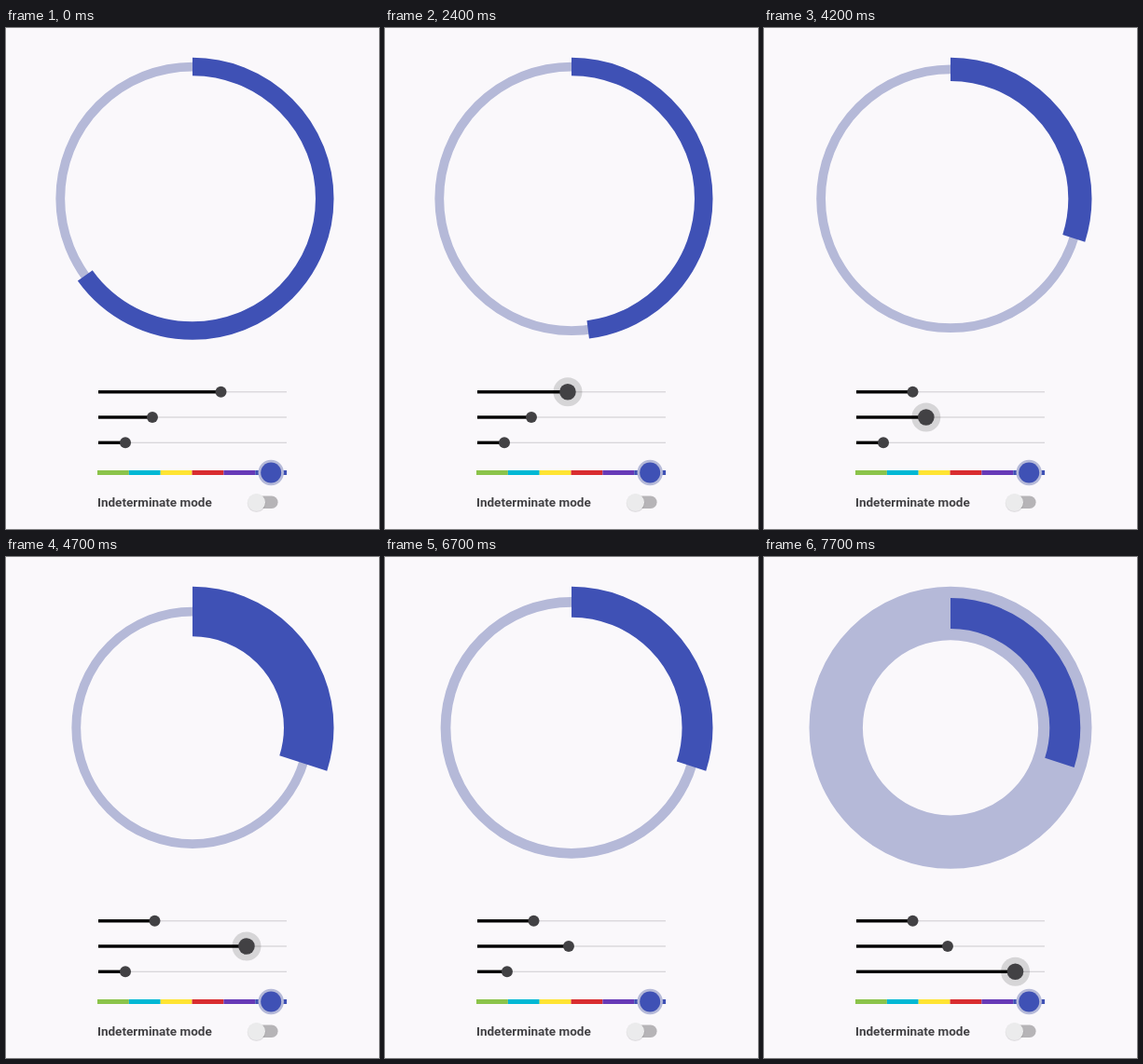
These frames come from a looping animation (400 by 538 pixels, 8000 ms). An HTML page:

```html
<!DOCTYPE html>
<html lang="en">
<head>
<meta charset="utf-8">
<title>Progress ring</title>
<style>
  html, body { margin: 0; height: 100%; overflow: hidden; background: #faf8fb; }
  svg { display: block; width: 400px; height: 538px; }
  text { font: 700 13.5px Roboto, sans-serif; fill: #424144; }
</style>
</head>
<body>
<svg id="stage" viewBox="0 0 400 538">
  <g fill="none" transform="rotate(-90 200 183.3)">
    <circle id="track" cx="200" cy="183.3" stroke="#b5b9d8"/>
    <circle id="progress" cx="200" cy="183.3" stroke="#3f51b5" pathLength="1"/>
  </g>
  <g id="sliders"></g>
  <g id="palette"></g>
  <circle cx="284.2" cy="477.5" r="13.7" fill="#b5b9d8"/>
  <circle cx="284.2" cy="477.5" r="11" fill="#3f51b5"/>
  <text x="98" y="514.4">Indeterminate mode</text>
  <rect x="262" y="502.6" width="29.6" height="13.4" rx="6.7" fill="#b6b4b7"/>
  <circle cx="268.6" cy="510.2" r="9.8" fill="#000" opacity=".1"/>
  <circle cx="268.6" cy="509.4" r="9.4" fill="#ebebec"/>
</svg>
<script>
const LOOP = 8000, TICK = 100;
const LEFT = 99, WIDTH = 202;
const OUTER = 151.5, MAX_STROKE = 68;

// keys: [ms, value]; press: [start, end] of the touch
const sliders = [
  { y: 390.8, press: [500, 3800], keys: [
    [500, .651], [1100, .869], [1200, .869], [1300, .8985], [2000, .14], [2100, .14],
    [2400, .48], [2900, .8], [3000, .8], [3400, .371], [3600, .312], [3800, .2995]] },
  { y: 418, press: [4000, 6200], keys: [
    [4100, .287], [4700, .787], [4900, .8], [5100, .34], [5200, .34], [5400, .08],
    [5500, .08], [5900, .455], [6000, .455], [6200, .485]] },
  { y: 445.3, press: [6700, Infinity], keys: [
    [6600, .1436], [6700, .158], [7500, .8], [7600, .8], [7700, .844]] }
];

const $ = id => document.getElementById(id);
const clamp = v => Math.max(0, Math.min(1, v));

function add(parent, tag, attrs) {
  const node = document.createElementNS("http://www.w3.org/2000/svg", tag);
  set(node, attrs);
  return parent.appendChild(node);
}

function set(node, attrs) {
  for (const name in attrs) node.setAttribute(name, attrs[name]);
}

function valueAt(keys, t) {
  const i = keys.findIndex(([time]) => time > t);
  if (i < 0) return keys[keys.length - 1][1];
  if (i === 0) return keys[0][1];
  const [t0, a] = keys[i - 1], [t1, b] = keys[i];
  return a + (b - a) * (t - t0) / (t1 - t0);
}

for (const s of sliders) {
  const g = $("sliders");
  add(g, "rect", { x: LEFT, y: s.y - .6, width: WIDTH, height: 1.2, fill: "#d5d3d6" });
  s.fill = add(g, "rect", { x: LEFT, y: s.y - 1.7, height: 3.4, fill: "#000" });
  s.halo = add(g, "circle", { cy: s.y, fill: "#000", opacity: .14 });
  s.thumb = add(g, "circle", { cy: s.y, fill: "#424144" });
}

["#8bc34a", "#00b8d4", "#ffe433", "#d92d30", "#673ab7", "#3f51b5"].forEach((fill, i) =>
  add($("palette"), "rect", { x: 98 + i * 33.85, y: 475, width: 33.85, height: 5, fill }));

function draw(t) {
  const [amount, stroke, trackStroke] = sliders.map(s => {
    const value = valueAt(s.keys, t), x = LEFT + WIDTH * value;
    const pressed = clamp(Math.min(t - s.press[0], s.press[1] - t) / 200);
    set(s.fill, { width: x - LEFT });
    set(s.halo, { cx: x, r: 15.5 * pressed });
    set(s.thumb, { cx: x, r: 6 + 2.8 * pressed });
    return value;
  });
  const r = OUTER - MAX_STROKE * Math.max(stroke, trackStroke) / 2;
  set($("track"), { r, "stroke-width": MAX_STROKE * trackStroke });
  set($("progress"), { r, "stroke-width": MAX_STROKE * stroke, "stroke-dasharray": `${amount} 2` });
}

const start = performance.now();
function frame() {
  const t = (performance.now() - start) % LOOP;
  draw(Math.floor(t / TICK) * TICK);
  requestAnimationFrame(frame);
}
frame();
</script>
</body>
</html>
```
